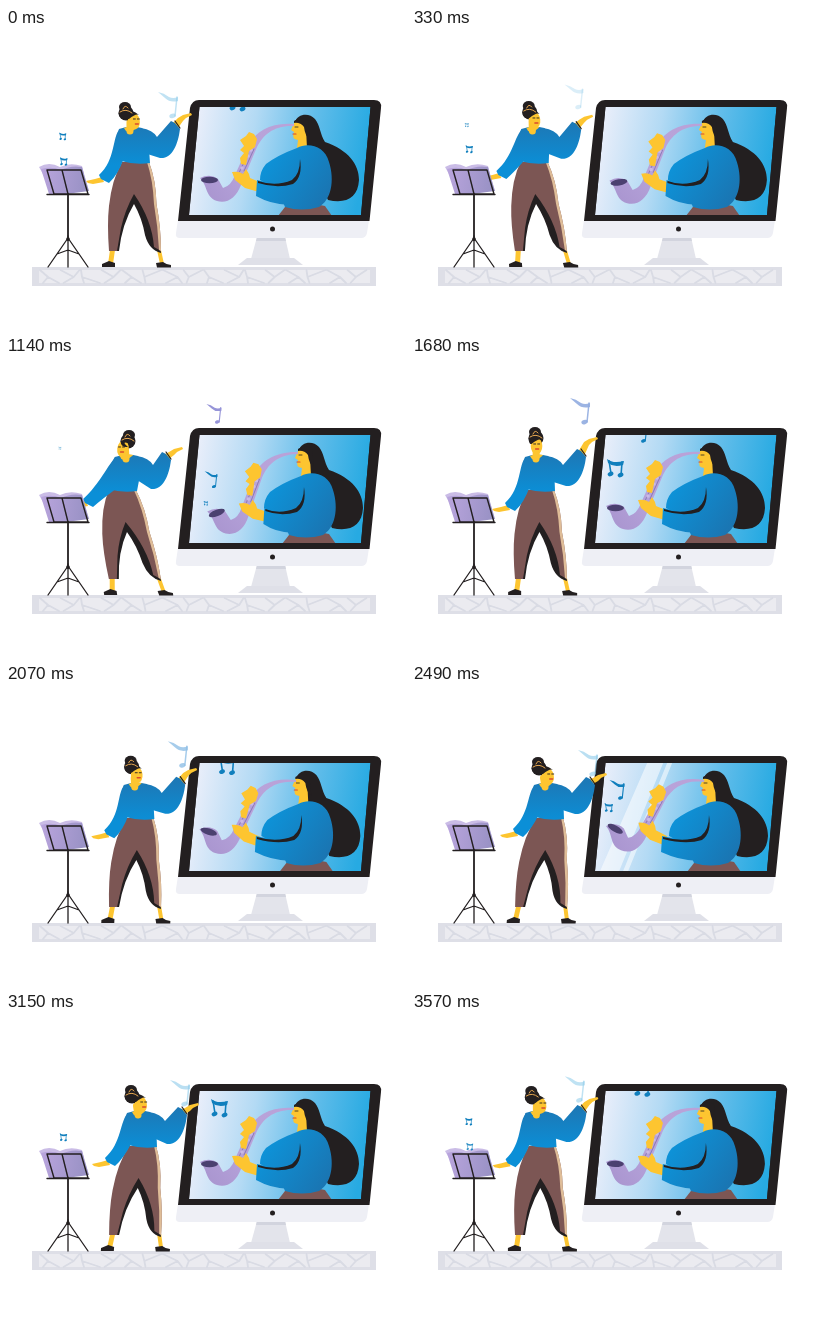
Recreate the animation shown at these times as an HTML page with a canvas. Size 400 by 300 pixels, loop 3600 ms.

```html
<!DOCTYPE html>
<html lang="en">
<head>
<meta charset="utf-8">
<title>Online music lesson</title>
<style>
html, body { margin: 0; width: 100%; height: 100%; overflow: hidden; background: #fff; }
canvas { display: block; }
</style>
</head>
<body>
<canvas id="stage" width="400" height="300"></canvas>
<script>
const ctx = document.getElementById('stage').getContext('2d');
const LOOP = 3600;
const SKIN = '#fdc530', INK = '#231f20', BROWN = '#7c5654', NOTE = '#107fbd';

function gradient(x0, y0, x1, y1, ...colors) {
  const g = ctx.createLinearGradient(x0, y0, x1, y1);
  colors.forEach((c, i) => g.addColorStop(i / (colors.length - 1), c));
  return g;
}
function fill(color, d) {
  ctx.fillStyle = color;
  ctx.fill(new Path2D(d));
}
function line(color, width, d) {
  ctx.strokeStyle = color;
  ctx.lineWidth = width;
  ctx.stroke(new Path2D(d));
}
function oval(color, x, y, rx, ry = rx, turn = 0) {
  ctx.fillStyle = color;
  ctx.beginPath();
  ctx.ellipse(x, y, rx, ry, turn, 0, 7);
  ctx.fill();
}
function group(draw) {
  ctx.save();
  draw();
  ctx.restore();
}

const SHIRT = gradient(0, 98, 0, 137, '#1c79b7', '#0b8fd7');
const PLAYER_SHIRT = gradient(262, 128, 322, 168, '#0d93d9', '#1a75b2');
const SCREEN = gradient(186, 120, 356, 150, '#e9eefa', '#b3daf4', '#62bdea', '#27aae2');
const SAX = gradient(196, 160, 270, 100, '#aa96d0', '#b7a4db', '#b9a2d8');
const BOOK = gradient(36, 150, 82, 156, '#b8a4dc', '#9891c4');

// Pose values at shared times, joined by a smooth periodic curve.
const TIMES = [0, 690, 1140, 1680, 2490, 3150];
const POSE = {
  hip: [0, -14, -13, -1, 8, 7],
  neck: [0, -6, -4, 0, 9, 8],
  hair: [120, 117, 122, 124, 127, 126],
  hairY: [82, 80, 82, 79, 81, 81],
  face: [128, 117.5, 117, 124.5, 136, 135],
  cuffLX: [98, 81, 82, 98, 106, 104],
  cuffLY: [150, 142, 146, 150, 148, 149],
  cuffRX: [169, 160, 160, 169, 178, 176],
  cuffRY: [98, 100, 101, 98, 98, 100],
  palm: [1, 4, 4, -3, 5, 5],
  player: [0, 4, 4, 0, 3, 0],
  sax: [0, 4, 4, 0, 4, 0],
  tilt: [0, -.06, -.06, 0, .085, 0]
};
function poseAt(t) {
  const n = TIMES.length;
  const time = i => TIMES[(i + n) % n] + LOOP * Math.floor(i / n);
  const i = TIMES.findLastIndex(k => k <= t);
  const span = time(i + 1) - time(i), u = (t - time(i)) / span;
  const pose = {};
  for (const name in POSE) {
    const v = k => POSE[name][(k + n) % n];
    const slope = k => (v(k + 1) - v(k - 1)) / (time(k + 1) - time(k - 1)) * span;
    const a = v(i), b = v(i + 1), m = slope(i), w = slope(i + 1);
    pose[name] = a + u * (m + u * (3 * (b - a) - 2 * m - w + u * (2 * (a - b) + m + w)));
  }
  return pose;
}

// Rows are [time, x, y, scale, alpha]; a track may run past the loop end.
function track(t, rows, draw) {
  for (const now of [t, t + LOOP]) {
    const i = rows.findIndex(r => r[0] > now);
    if (i < 1) continue;
    const a = rows[i - 1], b = rows[i], u = (now - a[0]) / (b[0] - a[0]);
    const [, x, y, scale, alpha] = a.map((v, k) => v + (b[k] - v) * u);
    group(() => {
      ctx.translate(x, y);
      ctx.scale(scale, scale);
      ctx.globalAlpha = alpha;
      draw(now);
    });
  }
}
function pairNote() {
  line(NOTE, 1.6, 'M-5 7L-7 -6M5 8L6 -5');
  fill(NOTE, 'M-9 -8Q-3 -3 8 -6L7 -2Q-2 1 -8 -4Z');
  oval(NOTE, -5.5, 7, 3, 2.2, -.4);
  oval(NOTE, 4.5, 8, 3, 2.2, -.4);
}
function flagNote(color) {
  line(color, 1.5, 'M9 -7L7 12');
  fill(color, 'M-10 -12Q-4 -11 1 -7Q5 -5 10 -7L10 -3Q2 -1 -3 -6Z');
  oval(color, 4.5, 12, 3.2, 2.2, -.3);
}
function screenFlag() {
  ctx.scale(.75, .75);
  flagNote(NOTE);
}
function flyingNote(now) {
  const u = Math.min(1, Math.max(0, (now - 1140) / 1200));
  flagNote(`rgb(${150 - 10 * u},${148 + 54 * u},${216 + 18 * u})`);
}

const SCREEN_NOTES = [
  [[800, 202, 150, .2, 0], [1140, 205, 123, .85, 1], [1680, 228, 76, 1, 1], [1800, 232, 66, 1, 1]],
  [[1040, 200, 152, .1, 0], [1140, 200, 147, .25, 1], [1680, 204, 111, 1, 1], [2260, 230, 66, 1, 1]],
  [[2050, 196, 141, .2, 0], [2490, 205, 105, 1, 1], [3000, 228, 66, 1, 1]],
  [[2320, 196, 130, .2, 0], [2490, 197, 123, .5, 1], [3150, 214, 95, 1, 1], [3600, 232, 73, 1, 1], [3700, 236, 66, 1, 1]]
];
const FLIGHT = [
  [420, 203, 140, .2, 0], [690, 203, 112, .6, .9], [1140, 208, 57, .75, 1], [1380, 194, 41, .9, 1],
  [1680, 168, 54, 1, .9], [2190, 173, 74, 1, .75], [2490, 176, 78, 1, .6], [3150, 174, 80, 1, .6],
  [3600, 162, 76, 1, .55], [4200, 162, 61, .9, .12], [4400, 162, 56, .8, 0]
];

function drawFloor() {
  fill('#dedfe7', 'M26 239H370V258H26Z');
  fill('#ebebf0', 'M33 242H364V255H33Z');
  let cracks = '';
  for (let i = 0; i < 16; i++) {
    const x = 34 + i * 20.5, lean = 7 * Math.sin(i * 2.3);
    cracks += `M${x} 242L${x + 8 + lean} 249L${x + 3} 255M${x + 8 + lean} 249L${x + 19} ${i % 2 ? 242 : 255}`;
  }
  line('#d9dbe4', 1.8, cracks);
}

function drawSax(p) {
  ctx.translate(287 + p.sax, 99);
  ctx.rotate(p.tilt);
  ctx.translate(-287, -99);
  fill(SAX, 'M288 98C268 97 257 107 251 119L235 157C230 170 221 176 211 173C199 169 202 158 194 150Q204 145 212 151L217 160Q225 158 229 147L243 116C250 103 266 94 288 96Z');
  oval('#4b4070', 203.5, 152, 8.5, 3.2, p.tilt * 5);
  line('#8e7bb8', 1, 'M242 126L231 149M248 121L238 143');
  for (let i = 0; i < 5; i++) oval('#c9b9e6', 245 - i * 3, 122 + i * 6, 1.8);
  fill(SKIN, 'M234 112L240 108L243 104L248 106L251 111L249 119L243 123L240 137L235 136L234 130L238 125L234 122L238 118Z');
  fill(SKIN, 'M226 144Q233 143 237 146L240 141L243 146L244 150L256 155L253 164L239 160L229 152Z');
}

function drawPlayer(p) {
  group(() => {
    ctx.translate(p.player, 0);
    fill(BROWN, 'M279 179Q300 173 319 178L326 188H272Z');
    fill(INK, 'M289 94C291 86 303 84 309 91C314 97 314 106 319 114C342 122 353 136 353 152C352 170 340 176 322 172L298 122Z');
    fill(SKIN, 'M289 93Q297 92 300 101L301 120H291L292 112Q285 111 288 104L285 102Z');
    fill(INK, 'M288 93Q294 88 302 92L304 112Q299 108 298 99Q294 94 288 95Z');
    line(INK, .8, 'M289 99h3');
    line('#d9482f', 1.2, 'M287 106h3');
    fill(PLAYER_SHIRT, 'M291 120C302 114 319 118 323 134C329 153 325 172 313 179Q296 184 279 179L272 162L254 152Q254 143 260 136Q272 127 291 120Z');
  });
  group(() => drawSax(p));
  group(() => {
    ctx.translate(p.player, 0);
    const reach = (p.sax - p.tilt * 70 - p.player) * .8;
    fill(PLAYER_SHIRT, `M${251 + reach} 152Q268 157 284 154L293 143L318 151Q312 175 290 176Q270 179 ${250 + reach} 168Z`);
    fill(INK, `M${252 + reach} 153Q270 159 286 152Q294 146 294 131Q297 149 287 156Q271 161 ${252 + reach} 155Z`);
  });
}

function drawMonitor(t, p) {
  fill('#e3e4eb', 'M251 209H279L284 231H245Z');
  fill('#d2d4de', 'M251 209H279L280 213H250Z');
  fill('#dfe0e8', 'M241 230H288L297 237H232Z');
  fill('#eeeff5', 'M172 192H363L361 205Q360 210 355 210H174Q169 210 170 205Z');
  fill(INK, 'M193 72H368Q376 72 375 80L363.500 193H172L184 80Q186 72 193 72Z');
  oval(INK, 266.5, 201, 2.5);
  group(() => {
    const pane = 'M193.500 79H364.500L355 187H183Z';
    ctx.clip(new Path2D(pane));
    fill(SCREEN, pane);
    const x = (t - 2490) * .16;
    ctx.globalAlpha = Math.max(0, 1 - Math.abs(t - 2490) / 620) * .55;
    fill('#fff', `M${235 + x} 79h16L${207 + x} 187h-19ZM${255 + x} 79h5L${216 + x} 187h-5Z`);
    ctx.globalAlpha = 1;
    drawPlayer(p);
    SCREEN_NOTES.forEach((rows, i) => track(t, rows, i % 2 ? pairNote : screenFlag));
  });
}

function drawLegs(p) {
  group(() => {
    const c = -p.hip / 89;
    ctx.transform(1, 0, c, 1, -c * 224, 0);
    fill(SKIN, 'M104 222H109L107 236H102ZM151 222H155L158 236H154Z');
    fill(INK, 'M96 236L103 233L109 235V239H96ZM150 235L157 234Q161 237 165 237V239.500H151Z');
    fill(INK, 'M127 160L117 184L110 223H113Q116 196 128 176Q136 190 139 207Q143 222 155 225L152 203Z');
    fill(BROWN, 'M116 134H143Q150 152 150.500 176Q155 200 155 223L148 219Q146 192 128 166Q119 182 115 200L111 223H103Q101 196 103 178Q106 151 116 134Z');
    fill('#dfbd98', 'M141 134H143Q150 152 150.500 176Q155 200 155 223L153 222Q152 199 148 176Q147 152 141 134Z');
  });
}

function drawHead(p) {
  const { hair: x, hairY: y, face } = p, turn = face - x, side = Math.sign(turn) || 1;
  line(SKIN, 7, `M${(face + x) / 2} 94L${124 + p.neck} 103`);
  oval(INK, x, y + 3, 7.5, 7.5);
  oval(SKIN, face, y + 11, 5.8, 8.5, -turn * .025);
  fill(INK, `M${x - 7.5} ${y + 3}Q${x} ${y - 5} ${face + 5} ${y + 5}Q${face + side * 2} ${y + 3} ${face - side * 5} ${y + 9}Q${x - 7} ${y + 10} ${x - 7.5} ${y + 3}Z`);
  oval(INK, x - side, y - 3, 6, 5);
  line('#e4a650', 1, `M${x - 3} ${y - 1}q2 -5 5 -1M${x - 6} ${y + 2}q6 -4 12 1`);
  const look = face + turn * .3;
  line(INK, .9, `M${look - 3} ${y + 9}h2M${look + 1} ${y + 9}h2`);
  line('#d94a2c', 1.4, `M${look - 1} ${y + 14}h3`);
}

function drawWoman(p) {
  const { cuffLX: lx, cuffLY: ly, cuffRX: rx, cuffRY: ry } = p;
  const left = 114 + p.neck, right = 135 + p.neck, py = ry + p.palm;
  drawLegs(p);
  fill(SKIN, `M${lx - 2} ${ly - 1}L${lx - 9} ${ly + 1}L${lx - 18} ${ly + 3}L${lx - 16} ${ly + 5}L${lx - 11} ${ly + 6}L${lx} ${ly + 4}Z`);
  fill(SKIN, `M${rx - 3} ${ry - 2}L${rx + 3} ${py - 9}L${rx + 8} ${py - 12}L${rx + 16} ${py - 14}L${rx + 17} ${py - 12}L${rx + 11} ${py - 9}L${rx + 8} ${py - 6}L${rx + 3} ${ry + 2}Z`);
  fill(SHIRT, `M${left} 101C${left - 8} 108 ${lx + 12} ${ly - 18} ${lx - 5} ${ly - 3}L${lx - 3} ${ly + 1}L${lx + 5} ${ly + 5}Q${lx + 14} ${ly - 3} ${left + 4} 130Z`);
  fill(SHIRT, `M${right} 100Q${right + 12} 102 ${right + 16} 109L${rx - 4} ${ry - 5}L${rx} ${ry - 3}L${rx + 5} ${ry + 3}C${rx + 3} ${ry + 19} ${rx - 3} ${ry + 33} ${rx - 15} ${ry + 32}L${right} 124Z`);
  group(() => {
    const c = (p.hip - p.neck) / 35;
    ctx.transform(1, 0, c, 1, p.neck - c * 100, 0);
    fill(SHIRT, 'M113 101Q124 97 136 100Q144 107 143 120L144 135Q129 137 115 133Q115 122 110 112Z');
    fill(SKIN, 'M118 100Q124 97 131 99Q126 105 120 103Z');
  });
  line(INK, 1.2, `M${rx} ${ry - 5}l5 7`);
  drawHead(p);
}

function drawStand(t) {
  fill('#cabce6', 'M33 139Q43 133 54 139Q64 134 76 138L78 146H37Z');
  fill(BOOK, 'M35 141Q46 138 55 142Q65 137 76 139L83 163L60 166H43Z');
  line(INK, 1.4, 'M41 142H75L82 166H48ZM56 142L62 166M41 166.500H83');
  line(INK, 1.8, 'M62 166V212');
  line(INK, 1.3, 'M62 208V239M62 210L42 239M62 210L82 239M51 226L62 222L73 226');
  oval(INK, 62, 211, 1.8);
  for (const born of [2750, 3420]) {
    const rows = [[born, 58, 140, .2, 0], [born + 180, 58, 133, .45, 1], [born + 850, 57, 108, .42, 1], [born + 1320, 54, 92, .15, .7], [born + 1450, 53, 88, .1, 0]];
    track(t, rows, pairNote);
  }
}

function frame(now) {
  const t = now % LOOP, p = poseAt(t);
  ctx.fillStyle = '#fff';
  ctx.fillRect(0, 0, 400, 300);
  ctx.lineCap = ctx.lineJoin = 'round';
  drawFloor();
  drawMonitor(t, p);
  track(t, FLIGHT, flyingNote);
  drawWoman(p);
  drawStand(t);
  requestAnimationFrame(() => frame(performance.now() - start));
}
const start = performance.now();
frame(0);
</script>
</body>
</html>
```
